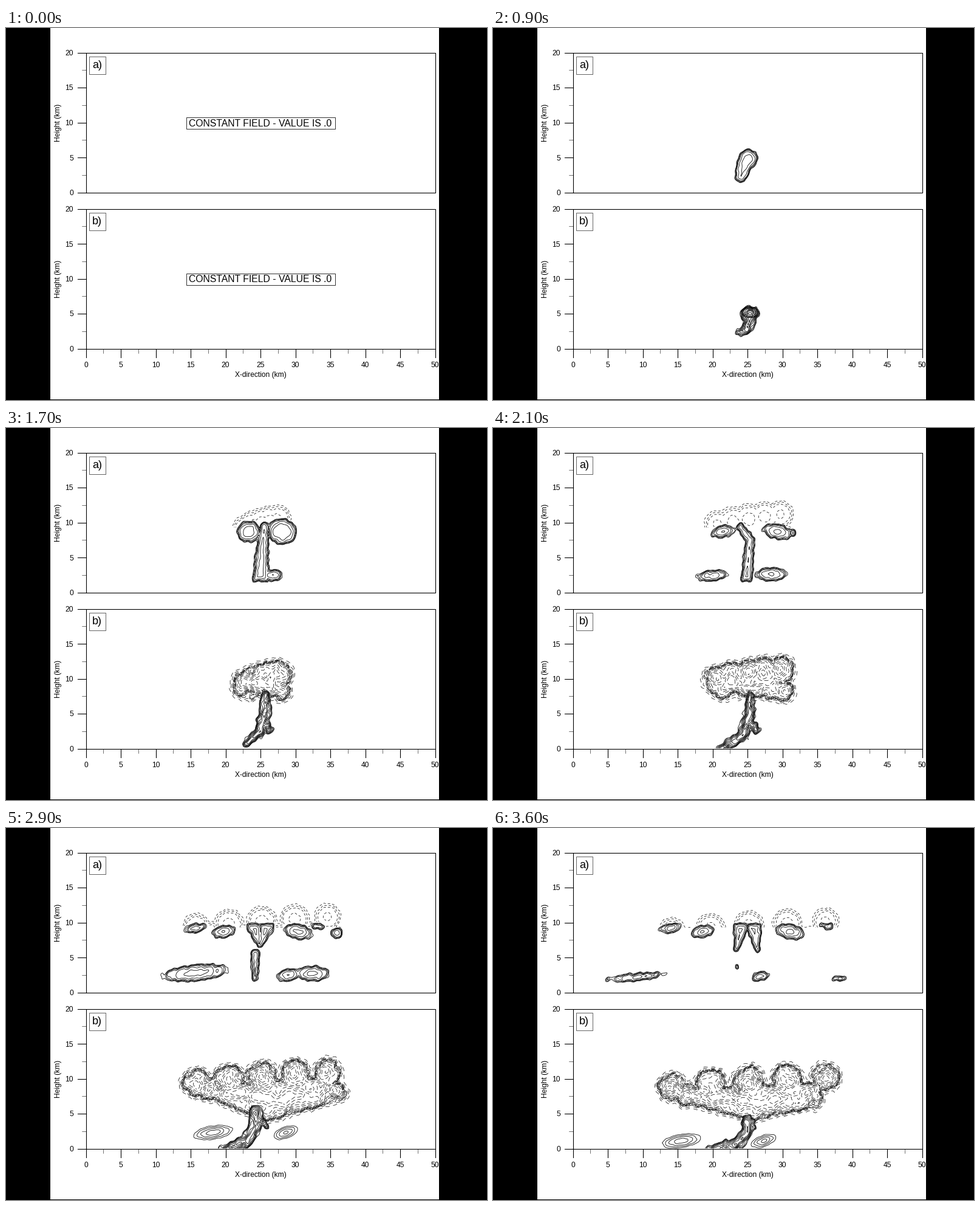
A matplotlib script for the animation above (3700 ms loop, 792 by 612 pixels).

```python
import numpy as np
import matplotlib.pyplot as plt
from matplotlib.animation import FuncAnimation
from matplotlib.patches import Rectangle

W, H, DPI = 792, 612, 100
PX = 72 / DPI            # one pixel in points
KM = 11.5                # pixels per kilometre
LEFT, GROUND_A, GROUND_B = 131.5, 270.5, 527.5
FRAMES, STEP = 37, 100

plt.rcParams["font.family"] = "Liberation Sans"
fig = plt.figure(figsize=(W / DPI, H / DPI), dpi=DPI, facecolor="black")
ax = fig.add_axes([0, 0, 1, 1])
ax.set_xlim(0, W)
ax.set_ylim(H, 0)
ax.axis("off")


# ---------- axes and labels ----------

def line(x, y, w=1.1):
    ax.plot(x, y, color="black", lw=w * PX, zorder=5)


def box(x0, y0, x1, y1, w=1.1, **kw):
    kw = {"fc": "none", "ec": "black", "zorder": 5, **kw}
    return ax.add_patch(Rectangle((x0, y0), x1 - x0, y1 - y0, lw=w * PX, **kw))


def text(x, y, s, size=12, ha="center", rot=0):
    return ax.text(x, y, s, fontsize=size * PX, ha=ha, va="baseline",
                   rotation=rot, rotation_mode="anchor", zorder=6)


def panel(ground, tag):
    top = ground - 20 * KM
    box(LEFT, top, LEFT + 50 * KM, ground)
    for i in range(9):
        y, major = ground - i * 2.5 * KM, i % 2 == 0
        line([LEFT - (14 if major else 7), LEFT], [y, y], 1.1 if major else 0.55)
        if major:
            text(111, y + 4.5, f"{i * 5 // 2}", ha="right")
    text(88.5, ground - 10 * KM, "Height (km)", rot=90)
    box(LEFT + 5, top + 6, LEFT + 32, top + 35, 0.6)
    text(LEFT + 18.7, top + 25.5, tag, 18)


box(73, 0, 713, 611, 0, fc="white", ec="none", zorder=0)
panel(GROUND_A, "a)")
panel(GROUND_B, "b)")
for i in range(21):
    x, major = LEFT + i * 2.5 * KM, i % 2 == 0
    line([x, x], [GROUND_B, GROUND_B + (14 if major else 7)], 1.1 if major else 0.55)
    if major:
        text(x, GROUND_B + 30.5, f"{i * 5 // 2}")
text(LEFT + 25 * KM + 0.5, GROUND_B + 46.5, "X-direction (km)")

notes = []
for ground in (GROUND_A, GROUND_B):
    mid = ground - 10 * KM
    notes.append(box(296.5, mid - 9, 541.5, mid + 10, 0.8))
    notes.append(text(419, mid + 6, "CONSTANT FIELD - VALUE IS .0", 15.8))


# ---------- distance fields in km, positive inside ----------

X, Z = np.meshgrid(np.arange(4, 41, 1.5 / KM), np.arange(0.04, 14.6, 1.5 / KM))


def ellipse(x, z, rx, rz, tilt=0.0):
    c, s = np.cos(tilt), np.sin(tilt)
    u, v = (X - x) * c + (Z - z) * s, (Z - z) * c - (X - x) * s
    return (1 - np.hypot(u / rx, v / rz)) * min(rx, rz)


def disc(x, z, r):
    return r - np.hypot(X - x, Z - z)


def chain(*joints):
    """Tapered limb through joints (x, z, radius)."""
    limbs = []
    for (x0, z0, r0), (x1, z1, r1) in zip(joints, joints[1:]):
        dx, dz = x1 - x0, z1 - z0
        h = np.clip(((X - x0) * dx + (Z - z0) * dz) / (dx * dx + dz * dz + 1e-9), 0, 1)
        limbs.append(r0 + (r1 - r0) * h - np.hypot(X - x0 - h * dx, Z - z0 - h * dz))
    return union(limbs)


def convex(*pts):
    """Convex polygon, corners counterclockwise."""
    sides = []
    for (x0, z0), (x1, z1) in zip(pts, pts[1:] + pts[:1]):
        dx, dz = x1 - x0, z1 - z0
        sides.append((dx * (Z - z0) - dz * (X - x0)) / np.hypot(dx, dz))
    return np.min(sides, axis=0)


def union(parts):
    return np.max(parts, axis=0)


def fade(t, on, off=9.0, span=0.3):
    return np.clip(min(t - on, off - t) / span, 0, 1)


rng = np.random.default_rng(4)


def waves(n, short, long):
    k = 2 * np.pi * KM / rng.uniform(short, long, n)
    a, phase, drift = rng.uniform(0, 2 * np.pi, (3, n))
    plane = [ki * (X * np.cos(ai) + Z * np.sin(ai)) + p for ki, ai, p in zip(k, a, phase)]
    return lambda t: sum(np.sin(w + t * (d - np.pi)) for w, d in zip(plane, drift)) / np.sqrt(n / 2)


ripple, swirl = waves(8, 8, 18), waves(8, 18, 48)


# ---------- the storm ----------

# drifting cloud decks: start x, total drift, height, half width, half depth, on, off
DECKS = [(23.3, -4.7, 8.7, 1.7, 0.9, 1.15, 9), (28.1, 3.0, 8.7, 2.1, 1.1, 1.15, 9),
         (21.0, -7.0, 9.2, 1.6, 0.7, 2.3, 9), (26.8, 12.0, 8.5, 0.8, 0.8, 1.9, 3.2),
         (23.0, 13.4, 9.5, 1.0, 0.5, 2.6, 9)]


def trunk(t):
    top = np.interp(t, [0.3, 0.9, 1.4, 2.55, 2.9, 3.6], [2.5, 4.8, 9.4, 9.3, 5.5, 3.8])
    head = np.interp(t, [0.9, 1.7, 2.1, 2.5, 2.9, 3.6], [25.1, 25.6, 24, 24.9, 24.3, 23.5])
    base = np.interp(t, [0.9, 1.7, 2.5, 2.9, 3.6], [24, 25, 24.8, 24.2, 23.5])
    foot = np.interp(t, [2.9, 3.6], [2.1, 3.6])
    r0 = np.interp(t, [0.3, 0.9, 1.7, 2.5, 3.6], [0.4, 0.8, 1.2, 0.6, 0.2])
    r1 = np.interp(t, [0.3, 0.9, 1.4, 2.1, 2.5, 2.9, 3.6], [0.5, 1.4, 0.8, 0.6, 0.4, 0.7, 0.2])
    neck = (0.4 * base + 0.6 * head + fade(t, 1.7, 2.5), foot + 0.75 * (top - foot),
            0.3 * r0 + 0.7 * r1)
    return chain((base, foot, r0), neck, (head, top, r1))


def outflow(t):
    keys = [1.5, 2.1, 2.9, 3.6]

    def lobe(x, rx, rz, tilt):
        x, rx, rz = (np.interp(t, keys, v) for v in (x, rx, rz))
        return ellipse(x, 1.6 + rz, rx, rz, tilt)

    parts = [lobe([26, 28.4, 32.5, 38.2], [1, 2.3, 2.4, 1], [0.8, 1, 1.1, 0.4], 0)]
    if t > 1.8:
        parts.append(lobe([23, 20, 15.7, 9.1], [1, 2.3, 4.8, 4.1], [0.3, 0.8, 1.2, 0.6], 0.1))
    if t > 2.1:
        parts.append(lobe([26, 26.5, 29, 26.8], [1, 1.5, 1.7, 1.3], [0.5, 0.7, 0.9, 0.7], 0.2))
    return union(parts) if t > 1.3 else np.full_like(X, -9)


def cloud(t):
    parts = [trunk(t), outflow(t)]
    drift = np.clip((t - 1.7) / 1.9, 0, 1) ** 0.6
    puff = np.interp(t, [1.7, 2.1], [1.7, 1])
    for x, v, z, rx, rz, on, off in DECKS:
        s = fade(t, on, off)
        if s > 0:
            parts.append(ellipse(x + v * drift, z, rx * s, rz * s * puff, -0.2 * np.sign(v)))
    s = fade(t, 2.2)
    if s > 0:
        low = np.interp(t, [2.4, 2.9, 3.6], [8.3, 6.9, 6.2])
        split = np.interp(t, [2.9, 3.6], [0.1, 1.5])
        parts += [chain((25 + k * 0.9, 9.4, 1.1 * s), (24.9 + k * split, low, 0.45 * s))
                  for k in (-1, 1)]
    ceiling = np.interp(t, [1.7, 2.1, 2.5], [10.6, 10.3, 9.9])
    return np.minimum(union(parts), np.minimum(ceiling - Z, Z - 1.5))


def canopy(t):
    """A widening row of puffs, a roll at each end, a funnel beneath."""
    grow = fade(t, 1.0, span=0.6)
    if grow == 0:
        return np.full_like(X, -9)
    mid = 25.2
    spread = np.interp(t, [1.2, 1.7, 2.1, 2.5, 2.9, 3.6], [0.8, 2.3, 4.5, 7, 9.4, 11])
    lift = np.interp(t, [1, 1.7, 2.1, 2.6, 3.6], [-3, -0.5, 0.1, 0, -0.9])
    parts = [disc(mid + s * spread, 10.4 + 0.7 * s + lift, (2.2 - 0.3 * s * s) * grow)
             for s in np.linspace(-1, 1, 5)]
    roll = np.interp(t, [1.2, 1.7, 2.9, 3.6], [7.3, 8.3, 8.1, 7.2])
    west, east = mid - 0.8 * spread, mid + 1.12 * spread - 3.2 * fade(t, 2.9, span=0.7)
    parts += [disc(west, roll + 0.5, 1.6 * grow), disc(east, roll, 1.4 * grow)]
    apex = np.interp(t, [1.2, 2.1, 2.5, 2.9, 3.6], [7.2, 7.3, 5.2, 3.9, 4.1])
    parts.append(convex((west, roll - 0.8), (26, apex), (east, roll - 1.2),
                        (mid + spread, 10.4 + lift), (mid - spread, 9.6 + lift)))
    return union(parts)


def updraft(t):
    top = np.interp(t, [0.3, 0.9, 1.7, 2.5, 2.9, 3.6], [2.8, 4.7, 7.8, 7.6, 5.2, 3.8])
    head = np.interp(t, [0.3, 0.9, 1.7, 2.5, 2.9, 3.6], [25, 25.3, 25.7, 25, 24.3, 25])
    foot = np.interp(t, [0.9, 1.7, 2.5], [23.8, 22.8, 19.6])
    sink = np.interp(t, [0.9, 1.7, 2.2], [2.3, 0.7, -0.2])
    thin = np.interp(t, [0.3, 0.9, 1.7, 2.5], [0.4, 0.5, 0.5, 0.6])
    wide = np.interp(t, [0.3, 0.9, 1.7, 2.5, 2.9, 3.6], [0.5, 1.4, 0.6, 0.5, 1, 1])
    knee = 0.25 * foot + 0.75 * head
    parts = [chain((foot, sink, thin), (knee, sink + 0.25 * (top - sink), 0.9),
                   (head, 0.35 * sink + 0.65 * top, 0.9), (head, top, wide))]
    if t > 1.2:
        parts.append(chain((25, 4, 0.7), (26.2, 2.8, 0.6 * fade(t, 1.2, 2.8) + 0.1)))
    return union(parts)


def side_lobes(t):
    s = fade(t, 2.2, span=0.7)
    if s == 0:
        return np.full_like(X, -9)
    z = np.interp(t, [2.5, 2.9, 3.6], [2.6, 2.3, 1.1])
    west = np.interp(t, [2.5, 2.9, 3.6], [19.7, 18.2, 15.5])
    east = np.interp(t, [2.9, 3.6], [28.6, 27.3])
    return union([ellipse(west, z, 2.8 * s, 0.95 * s, 0.16),
                  ellipse(east, z, 1.8 * s, 0.8 * s, 0.35)])


# ---------- contours ----------

drawn = []


def contour(ground, f, levels, dash=None, w=0.8):
    """Levels are pixel distances from the edge."""
    if np.nanmax(f) <= levels[0]:
        return
    styles = ["solid"]
    if dash:
        styles = [(3.7 * i / w, tuple(d / w for d in dash)) for i in range(len(levels))]
    drawn.append(ax.contour(LEFT + X * KM, ground - Z * KM, f, levels, colors="black",
                            linewidths=w * PX, linestyles=styles, zorder=3))


def update(k):
    while drawn:
        drawn.pop().remove()
    still = k < 3
    for note in notes:
        note.set_visible(still)
    if still:
        return
    t = k * STEP / 1000
    fine, broad = ripple(t), swirl(t)
    cap = canopy(t) * KM

    solid = cloud(t) * KM + 0.6 * fine
    contour(GROUND_A, solid, [0, 0.8, 1.7, 2.8, 5, 9])
    if t > 1.45:
        veil = np.where((solid > -1) | (Z < 9.3), np.nan, cap + 0.5 * fine)
        contour(GROUND_A, veil, [0, 2.8, 5.8, 15], (4, 3.2), 0.7)

    stem = updraft(t) * KM + 1.1 * fine
    contour(GROUND_B, stem, [0, 1, 2, 3.2, 4.6, 6.2, 8, 11])
    if t < 1.2:
        rise = np.interp(t, [0.3, 0.9], [3, 5.2])
        r = np.interp(t, [0.3, 0.9], [0.4, 1.3])
        contour(GROUND_B, ellipse(25.4, rise, r, 0.6 * r) * KM, [0, 1, 2, 3.5, 5.5])
    contour(GROUND_B, side_lobes(t) * KM + 0.3 * fine, [0, 2, 4.2, 7])
    top = cap + 0.7 * fine + broad * (0.8 + np.clip(cap, 0, 12) / 4)
    top[stem > 2] = np.nan
    contour(GROUND_B, top, [-5.5, -2.8], (7, 6), 0.7)
    contour(GROUND_B, top, [-0.8, 0.2, 1.3, 2.6, 4.3], (9, 1.6))
    contour(GROUND_B, top, [7.5, 11, 15, 19.5, 25], (7, 3.5), 0.7)


anim = FuncAnimation(fig, update, frames=FRAMES, interval=STEP,
                     repeat=True, repeat_delay=0, init_func=lambda: None)
plt.show()
```
